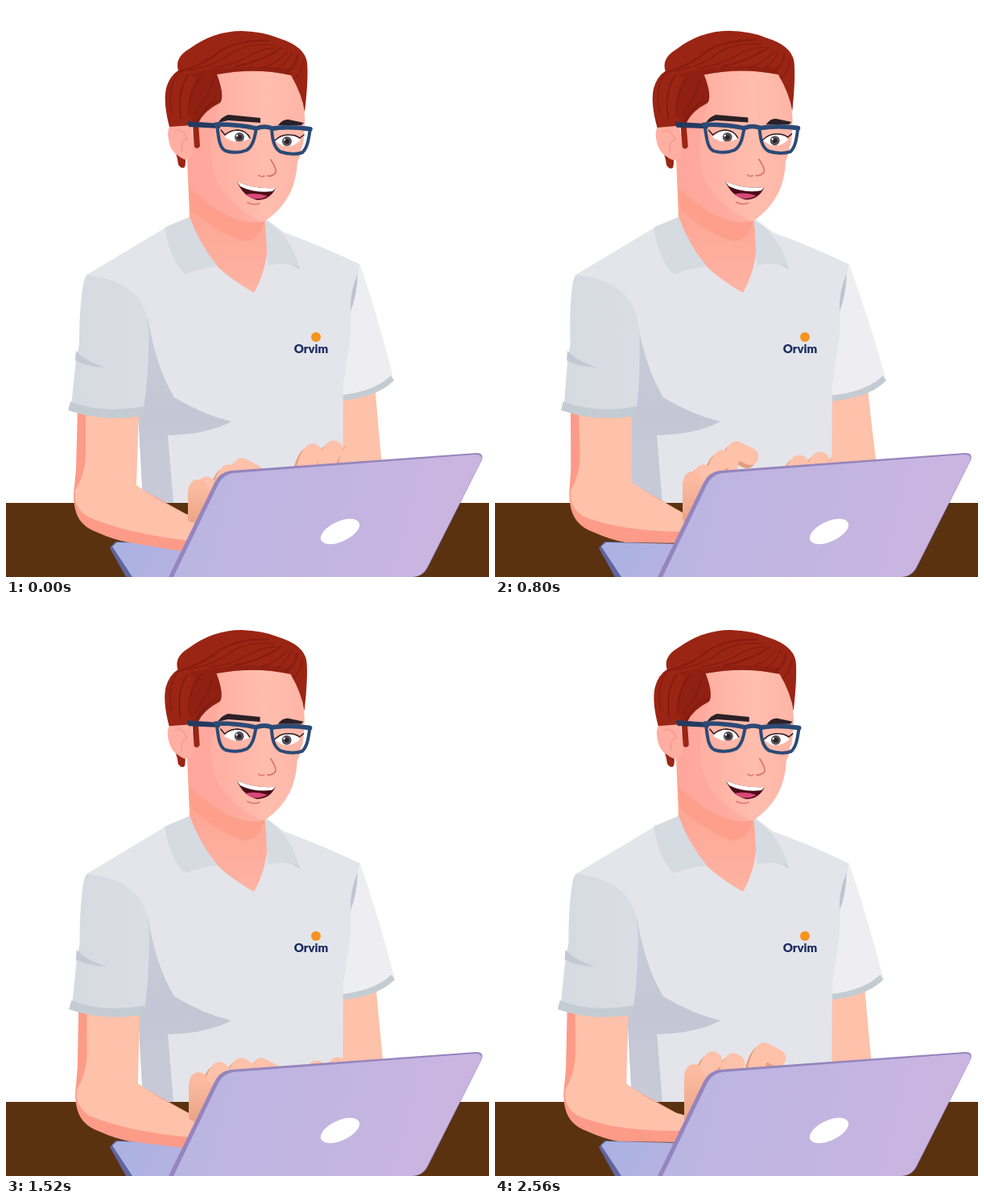
Recreate the animation shown at these times as an HTML page with a canvas. Size 600x709 px, loop 2640 ms.

```html
<!DOCTYPE html>
<html lang="pt">
<head>
<meta charset="utf-8">
<title>Typing at the laptop</title>
<style>
html, body { margin: 0; width: 100%; height: 100%; overflow: hidden; background: #fff; }
canvas { display: block; }
</style>
</head>
<body>
<canvas id="stage" width="600" height="709"></canvas>
<script>
const ctx = document.getElementById('stage').getContext('2d');
const LOOP = 2640, STEP = 80;
const SKIN = '#fec1a9', SHADE = '#fd9b89', FINGER_SHADE = '#e69c7f';
const HAIR = '#9b2514', HAIR_DARK = '#7d1a10', FRAME = '#2b4a76';

// time, sway, forearm bottom, four knuckles (x, y), right hand (x, y)
const poses = [
  [0, 0, 678, 237, 598, 249, 595, 276, 580, 293, 572, 381, 555],
  [320, 1, 667, 244, 591, 260, 583, 280, 569, 301, 558, 380, 592],
  [560, 0, 674, 240, 594, 260, 582, 284, 572, 304, 566, 380, 584],
  [800, 1, 667, 244, 588, 259, 580, 282, 562, 300, 551, 378, 569],
  [1120, .5, 668, 249, 586, 276, 568, 301, 572, 332, 559, 382, 592],
  [1360, 0, 676, 238, 594, 262, 582, 288, 572, 310, 570, 384, 584],
  [1520, .25, 675, 238, 590, 265, 578, 292, 573, 317, 573, 386, 577],
  [1840, .8, 668, 252, 585, 279, 570, 305, 568, 336, 561, 386, 567],
  [2000, 1, 667, 250, 584, 276, 569, 304, 566, 336, 560, 385, 574],
  [2240, .75, 667, 250, 584, 274, 572, 300, 566, 336, 562, 384, 584],
  [2560, .15, 667, 246, 580, 270, 565, 296, 567, 334, 554, 382, 594]
];

function poseAt(t) {
  const next = poses.findIndex(p => p[0] > t);
  const a = poses.at(next < 0 ? -1 : next - 1);
  const b = next < 0 ? [LOOP, ...poses[0].slice(1)] : poses[next];
  const u = (t - a[0]) / (b[0] - a[0]);
  const e = (1 - Math.cos(Math.PI * u)) / 2;
  return a.map((v, i) => v + (b[i] - v) * e);
}

function blinkAt(t) {
  return Math.max(0, 1 - Math.abs(t - 400) / 170);
}

const fill = (color, d) => {
  ctx.fillStyle = color;
  ctx.fill(new Path2D(d));
};
const line = (color, width, d) => {
  ctx.strokeStyle = color;
  ctx.lineWidth = width;
  ctx.stroke(new Path2D(d));
};
const disc = (color, x, y, r) => {
  ctx.fillStyle = color;
  ctx.beginPath();
  ctx.arc(x, y, r, 0, Math.PI * 2);
  ctx.fill();
};
const blend = (x0, y0, x1, y1, ...colors) => {
  const g = ctx.createLinearGradient(x0, y0, x1, y1);
  colors.forEach((c, i) => g.addColorStop(i / (colors.length - 1), c));
  return g;
};
function layer(draw) {
  ctx.save();
  draw();
  ctx.restore();
}
// Horizontal lean that grows below the shoulder line
const lean = (amount, y) => ctx.transform(1, 0, amount, 1, -amount * y, 0);

function shirt() {
  fill('#e3e5ea', 'M228 262L197 276Q150 304 100 334L165 400L165 510L170 617H418L419 470L428 410L429 372L440 321Q392 298 345 281L324 265Z');
  fill(blend(0, 390, 0, 615, '#cbcdd9', '#c5c6d5', '#c8cad7'),
    'M176 386Q186 448 209 486Q246 508 280 516Q250 532 201 533L208 617H170L164 505Z');
}

function rightArm(sway) {
  layer(() => {
    lean(.028 * sway, 321);
    fill(SKIN, 'M400 484L459 480Q463 530 467 570L400 580Z');
    fill('#eeeef2', 'M440 321Q462 386 481 461Q454 481 400 486L405 425L429 372Z');
    fill('#c4ccd3', 'M478 459L482 465Q457 490 400 491V484Q452 483 478 459Z');
  });
}

function neck() {
  fill(blend(0, 240, 0, 355, '#fea493', '#feac9c', '#feb3a3'),
    'M225 188L228 262Q240 296 262 323Q281 341 308 356Q324 328 325 294L321 262Z');
  fill('#fe9f8b', 'M228 224L230 253Q272 288 297 292Q316 291 322 262Z');
  fill('#d6dae1', 'M228 262L197 275Q204 316 222 333Q238 327 263 323Q240 296 228 262Z');
  fill('#c6cbd5', 'M326 321Q347 315 365 327L362 318Z');
  fill('#d6dae1', 'M322 266Q354 285 364 324Q345 317 325 322Z');
  fill('#c2c2d4', 'M437 332Q427 354 428 379Q436 360 437 332Z');
}

function badge() {
  disc('#f7941e', 385, 411, 6);
  ctx.fillStyle = '#1b2a63';
  ctx.font = '900 15px Lato, sans-serif';
  ctx.textAlign = 'center';
  ctx.fillText('Orvim', 379, 431);
}

function eye(shape, lid, x, y, blink) {
  layer(() => {
    ctx.clip(new Path2D(shape));
    fill('#fff', shape);
    disc('#5a535b', x, y, 6);
    disc('#2a2328', x, y, 3);
    disc('#fff', x - 3, y - 2, 1.2);
    ctx.fillStyle = '#fba99c';
    ctx.fillRect(x - 30, y - 13, 60, 24 * blink);
  });
  layer(() => {
    ctx.translate(0, 8 * blink);
    line('#2c1c20', 1.5, lid);
  });
}

function hair() {
  fill(HAIR, 'M214 80Q209 64 228 53Q258 31 293 31Q321 32 339 40Q371 50 374 70Q376 89 371 132Q368 110 354 86Q310 76 262 85Q272 112 266 120Q246 130 239 145L241 174Q238 179 234 175L232 148L203 150Q195 120 199 102Q203 87 214 80Z');
  layer(() => {
    ctx.globalAlpha = .4;
    fill(HAIR_DARK, 'M228 84Q290 70 352 78L354 86Q310 76 262 85Q272 112 266 120Q246 130 239 145L232 146Q221 118 236 90Z');
    ctx.globalAlpha = .65;
    [
      'M215 82Q246 73 266 56Q288 42 326 43', 'M228 80Q260 74 282 57Q300 46 334 48',
      'M254 77Q282 74 300 63Q318 52 336 52', 'M285 75Q320 68 342 52',
      'M318 77Q340 70 349 57', 'M337 79Q350 69 355 57',
      'M349 82Q360 75 362 61', 'M358 91Q367 82 369 69',
      'M213 84Q201 100 206 130', 'M226 86Q212 106 217 139',
      'M244 85Q225 109 227 137', 'M258 90Q251 114 235 134',
      'M265 118Q250 119 237 143'
    ].forEach((d, i) => line(HAIR_DARK, i % 3 ? 1.6 : 2.6, d));
  });
}

function glasses() {
  fill('#24395f', 'M225 143L266 146V152L227 150Z');
  line(FRAME, 4, 'M262 148C264 160 264 176 273 180Q287 184 299 179C307 174 309 163 311 152Q287 147 262 148Z');
  line(FRAME, 4, 'M330 153C331 164 332 176 341 181Q356 186 368 182C375 176 376 164 378 152Q354 149 330 153Z');
  line(FRAME, 5.5, 'M261 147Q290 147 311 152Q321 148 331 152Q354 149 378 153');
  line('rgba(255,255,255,.7)', 2, 'M372 161Q372 171 367 178');
}

function head(sway, blink) {
  layer(() => {
    ctx.translate(280, 270);
    ctx.rotate(-.0125 * sway);
    ctx.translate(-280, -270);

    fill(HAIR, 'M205 170Q213 184 214 197Q218 203 222 200Q224 194 222 184L228 150Z');
    fill(blend(225, 0, 372, 0, '#ffaea2', '#ffb2a4', '#ffbdad', '#fdb5a6'),
      'M226 190L235 140L262 84Q310 75 355 84Q373 118 371 150Q370 178 362 194Q361 216 352 234Q342 253 322 267Q284 278 229 226Z');
    fill('rgba(255,154,147,.36)', 'M238 141L266 119Q247 180 262 218Q280 250 318 268Q282 276 229 226L227 190Z');
    fill('#ffaea2', 'M231 146Q204 133 201 158Q202 179 214 186Q226 196 233 185Z');
    line('#f69b91', 1.5, 'M210 155Q220 151 225 165Q216 168 219 180');
    hair();

    fill('#2b2027', 'M263 145Q269 137 276 135L316 139V145L276 142Z');
    fill('#2b2027', 'M338 148Q344 140 351 141L370 145L367 148Z');
    eye('M271 163Q278 154 288 154Q299 155 303 165Q291 170 281 168Z',
      'M267 154L272 160Q279 154 288 154Q299 155 303 164', 290, 163, blink);
    eye('M334 168Q342 159 352 160Q361 160 366 167Q357 176 344 174Z',
      'M334 167Q342 159 352 160Q360 160 365 164L370 160', 349, 168, blink);
    glasses();

    line('#dc756a', 1.8, 'M329 191Q338 205 334 208Q330 212 325 211');
    line('#dc756a', 1.5, 'M314 210Q317 213 321 211');
    fill('#4b0b18', 'M287 218Q309 228 335 226Q328 241 312 241Q294 236 287 218Z');
    fill('#fff', 'M287 218Q309 228 335 226L331 230Q309 233 291 224Z');
    fill('#d84879', 'M297 234Q312 231 325 236Q311 244 297 234Z');
    line('#df766d', 1.6, 'M300 244Q308 248 315 245');
  });
}

function laptopBase() {
  fill('#5f669f', 'M129 673L136 665L225 668L205 709H149Z');
  fill(blend(135, 668, 215, 709, '#a9b2e2', '#b5b2e1'), 'M132 671L138 666L230 668V709H157Z');
}

function finger(x, y, width, tail) {
  const shape = `M${x - 11} ${y + 32}Q${x - 8} ${y + 8} ${x} ${y}` +
    (tail ? `L${x + tail} ${y + tail / 2}` : '');
  layer(() => {
    ctx.translate(-4, 4);
    line(FINGER_SHADE, width, shape);
  });
  line(SKIN, width, shape);
}

function hands(k) {
  const [, , , x0, y0, x1, y1, x2, y2, x3, y3, rx, ry] = k;
  for (const i of [2, 1, 0]) finger(rx + i * 26, ry - (i ? 4 : 0), 23, i === 2 ? 6 : 0);
  layer(() => {
    ctx.beginPath();
    ctx.rect(x0 - 11, 500, 300, 150);
    ctx.clip();
    finger(x3, y3, 21, 17);
    finger(x2, y2, 21, 4);
    finger(x1, y1, 21, 2);
    fill(blend(0, y0, 0, 640, '#fbbba1', '#eca487'),
      `M${x0 - 11} ${y0 + 4}Q${x0 - 9} ${y0 - 9} ${x0} ${y0 - 10}Q${x0 + 11} ${y0 - 10} ${x0 + 12} ${y0}L275 610L241 645L${x0 - 11} 638Z`);
  });
}

function leftArm(sway, bottom) {
  layer(() => {
    lean(.03 * sway, 335);
    const inner = 595 - 4 * sway;
    const top = 631 - 2 * sway;
    const wrist = `L162 ${inner}Q190 ${inner + 20} 224 ${top}L250 638`;
    fill(SHADE, `M89 500L87 575L84 606C84 632 92 645 112 653Q134 663 152 666L224 ${bottom}L250 638L224 ${top}L160 ${inner}L165 500Z`);
    fill(SKIN, `M99 500H165${wrist}L226 ${bottom - 14}Q146 ${654 - 2 * sway} 101 634Q83 622 86 602Q98 582 99 558Z`);

    fill(blend(90, 0, 178, 0, '#d6dae1', '#dadde4'),
      'M100 334Q151 339 169 370Q179 389 177 425Q176 469 171 500Q125 514 81 496L87 440L91 420Q91 370 97 341Z');
    fill('#c4c8d4', 'M87 428Q98 441 124 449Q100 448 86 440Z');
    fill('#c3ccd2', 'M80 491Q119 507 171 497L169 509Q119 517 77 502Z');
  });
}

function laptopLid() {
  fill('#9585be', 'M202 709L259 592Q265 579 279 577L584 555Q594 555 591 564L524 697Q518 709 504 709Z');
  fill(blend(230, 600, 540, 680, '#bab5e2', '#c2b4e1', '#cab5e0'),
    'M208 709L264 593Q270 582 282 580L583 557Q593 557 590 565L523 697Q517 709 504 709Z');
  ctx.fillStyle = '#fff';
  ctx.beginPath();
  ctx.ellipse(415, 652.5, 26, 12.5, -.43, 0, Math.PI * 2);
  ctx.fill();
}

function draw(t) {
  const k = poseAt(t), sway = k[1];
  ctx.fillStyle = '#fff';
  ctx.fillRect(0, 0, 600, 709);
  ctx.lineCap = ctx.lineJoin = 'round';
  rightArm(sway);
  shirt();
  neck();
  badge();
  head(sway, blinkAt(t));
  ctx.fillStyle = '#5a3210';
  ctx.fillRect(0, 617, 600, 92);
  laptopBase();
  leftArm(sway, k[2]);
  hands(k);
  laptopLid();
}

function tick() {
  draw(Math.floor(performance.now() % LOOP / STEP) * STEP);
  requestAnimationFrame(tick);
}
tick();
</script>
</body>
</html>
```
